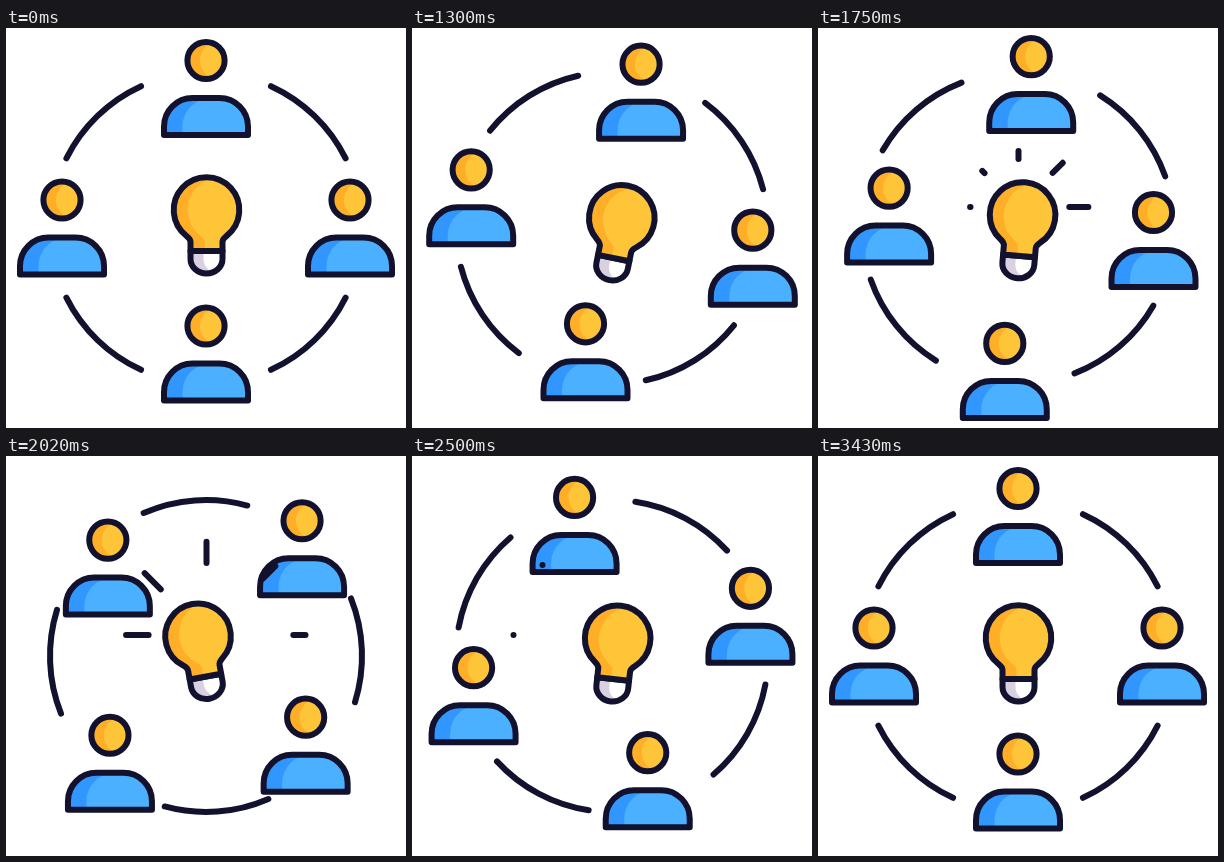
An HTML page that plays this animation: 400x400 px, repeating every 3460 ms.

```html
<!DOCTYPE html>
<html>
<head>
<meta charset="utf-8">
<style>
  html, body { margin: 0; width: 100%; height: 100%; overflow: hidden; background: #fff; }
  svg { display: block; width: 100vw; height: 100vh; }
</style>
</head>
<body>
<svg id="stage" viewBox="0 0 400 400"></svg>
<script>
const LOOP = 3460, START = 1000, END = 3430, INK = '#12122f';
const stage = document.getElementById('stage');

// An outlined shape: shade colour, plus the same shape shifted right as the lit part.
const shaded = (id, d, shade, light, shift) => `
  <clipPath id="${id}"><path d="${d}"/></clipPath>
  <path d="${d}" fill="${shade}" stroke="none"/>
  <g clip-path="url(#${id})"><path d="${d}" fill="${light}" stroke="none" transform="translate(${shift})"/></g>
  <path d="${d}" fill="none"/>`;

const head = 'M-18.6 0a18.6 18.6 0 0 1 37.2 0a18.6 18.6 0 0 1-37.2 0z';
const body = 'M-42 74.5V66a28.5 28.5 0 0 1 28.5-28.5h27A28.5 28.5 0 0 1 42 66v8.5z';
const glass = 'M184.5 223V214c0-3-1.5-4-4-6A32.8 32.8 0 1 1 220.5 208c-2.5 2-4 3-4 6V223z';
const base = 'M184.5 223V231a16 14.5 0 0 0 32 0V223z';

const polar = (r, deg) => {
  const a = deg * Math.PI / 180;
  return [r * Math.sin(a), -r * Math.cos(a)];
};
const arc = `M${polar(156, 24.6)}A156 156 0 0 1 ${polar(156, 63.5)}`;
const flips = ['1 1', '1 -1', '-1 -1', '-1 1'];

stage.innerHTML = `
  <defs><g id="person">
    ${shaded('head', head, '#ffae27', '#ffc538', 12.5)}
    ${shaded('body', body, '#3197fe', '#4bb0ff', 18.5)}
  </g></defs>
  <g stroke="${INK}" stroke-width="6" stroke-linecap="round" stroke-linejoin="round">
    <g id="ring" fill="none">${flips.map(f => `<path d="${arc}" transform="scale(${f})"/>`).join('')}</g>
    <g id="bulb">
      ${shaded('base', base, '#d9d0e2', '#fff', 13)}
      ${shaded('glass', glass, '#ffae27', '#ffc538', 14)}
    </g>
    ${'<use class="person" href="#person"/>'.repeat(4)}
    ${'<path class="ray"/>'.repeat(5)}
  </g>`;

const ring = document.getElementById('ring');
const bulb = document.getElementById('bulb');
const people = document.querySelectorAll('.person');
const rays = document.querySelectorAll('.ray');

const clamp = x => Math.min(1, Math.max(0, x));
const smooth = x => { x = clamp(x); return x * x * (3 - 2 * x); };

// cubic-bezier(x1, 0, x2, 1)
function ease(x, x1, x2) {
  let lo = 0, hi = 1;
  for (let i = 0; i < 24; i++) {
    const s = (lo + hi) / 2, u = 1 - s;
    if (3 * s * u * u * x1 + 3 * s * s * u * x2 + s * s * s < x) lo = s; else hi = s;
  }
  return smooth(lo);
}

function keyed(t, keys) {
  let value = keys[0][1];
  for (let i = 1; i < keys.length; i++) {
    const [t0, v0] = keys[i - 1], [t1, v1] = keys[i];
    value += (v1 - v0) * smooth((t - t0) / (t1 - t0));
  }
  return value;
}

const TILT = [[START, 0], [1510, 18], [2020, -10.4], [2500, 6.3], [2980, -1.4], [END, 0]];
const DROP = [[START, 0], [1510, 11], [2020, -2.5], [2500, 0]];

function draw(t) {
  const x = clamp((t - START) / (END - START));
  const turn = 180 * ease(x, .333, .126);
  ring.setAttribute('transform', `translate(200 200) rotate(${turn})`);

  // Top and bottom orbits differ, so they trade radii during the half turn.
  const swap = 13.5 * ease(x, .33, .58);
  [139.5 - swap, 144, 126 + swap, 144].forEach((r, i) => {
    const [px, py] = polar(r, turn + 90 * i);
    people[i].setAttribute('transform', `translate(${200 + px} ${172 + py})`);
  });

  bulb.setAttribute('transform',
    `translate(0 ${keyed(t, DROP)}) rotate(${keyed(t, TILT)} 200.5 229)`);

  rays.forEach((ray, i) => {
    const age = t - 1525 - 50 * i, angle = 90 - 45 * i;
    const reach = delay => polar(48 + 51 * smooth((age - delay) / 500), angle);
    ray.setAttribute('transform', 'translate(200.5 179)');
    ray.setAttribute('d', `M${reach(155)}L${reach(0)}`);
    ray.setAttribute('visibility', age > 0 && age < 850 ? 'visible' : 'hidden');
  });
}

function frame() {
  draw(performance.now() % LOOP);
  requestAnimationFrame(frame);
}
frame();
</script>
</body>
</html>
```
